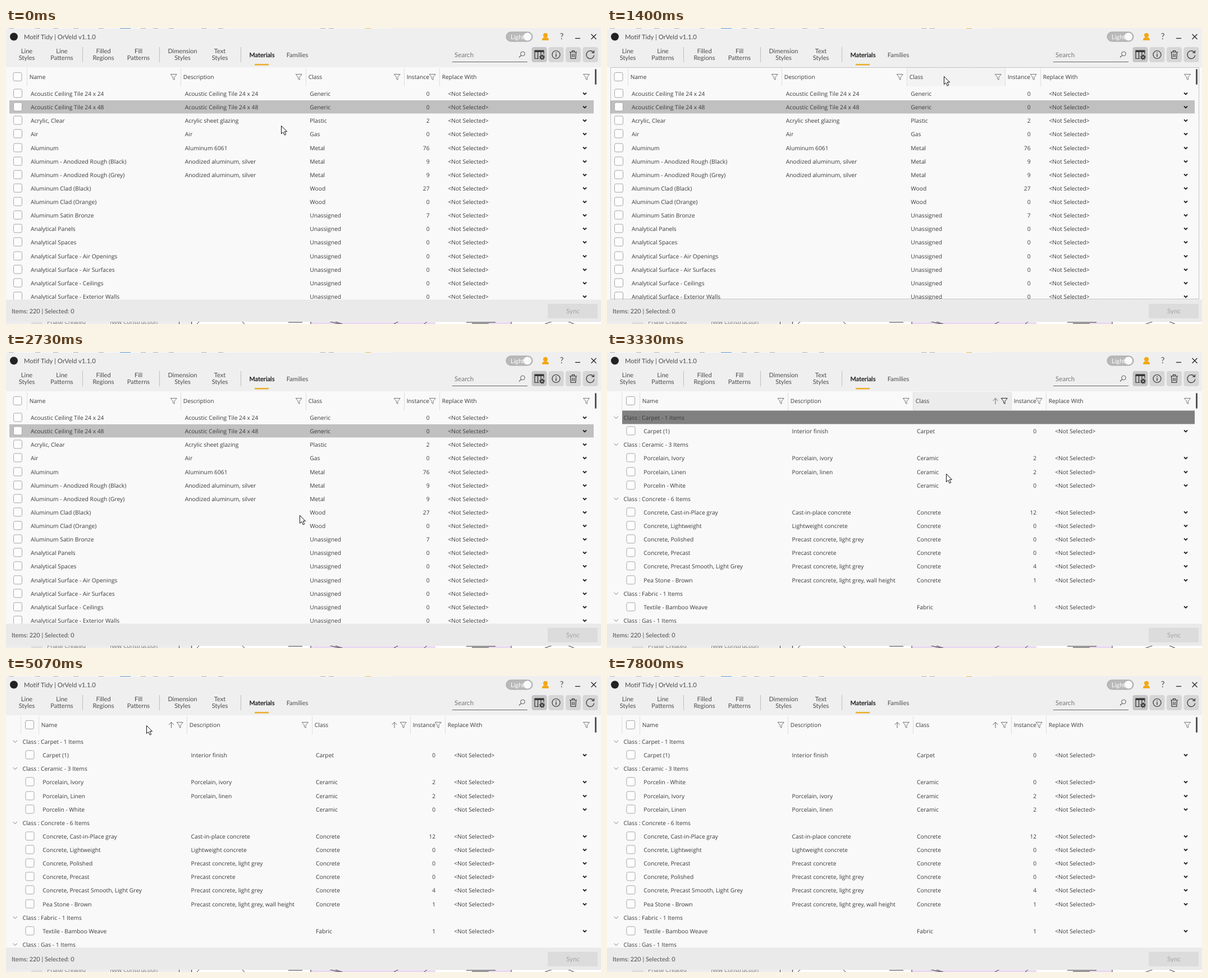
These frames come from a looping animation (1060x528 px, 8000 ms). An HTML page:

```html
<!DOCTYPE html>
<html lang="en">
<head>
<meta charset="utf-8">
<title>Materials table</title>
<style>
html, body { margin: 0; width: 100%; height: 100%; overflow: hidden; background: #fff; }
svg { display: block; font: 10.25px "Open Sans", "Noto Sans", sans-serif; text-rendering: geometricPrecision; }
text { fill: #3a3a3a; white-space: pre; }
.ui { font: 11.1px Lato, sans-serif; fill: #4c4c4c; }
.off { fill: #a3a3a3; }
.mid { text-anchor: middle; }
.end { text-anchor: end; }
.line { fill: none; stroke: #444; }
</style>
</head>
<body>
<svg width="1060" height="528" viewBox="0 0 1060 528">
  <g id="grid"></g><g id="chrome"></g><g id="overlay"></g>
</svg>
<script>
const LOOP = 8000, STEP = 66.667, ROW = 24.13;
const el = id => document.getElementById(id);

// Drawing helpers; text is placed by its vertical centre
const text = (x, y, s, cls = '', extra = '') =>
  `<text x="${x}" y="${y + 4}" class="${cls}" ${extra}>${s.replace(/</g, '&lt;')}</text>`;
const rect = (x, y, w, h, fill, extra = '') =>
  `<rect x="${x}" y="${y}" width="${w}" height="${h}" fill="${fill}" ${extra}/>`;
const line = (d, color = '#444', width = 1, extra = '') =>
  `<path d="${d}" class="line" style="stroke:${color};stroke-width:${width}" ${extra}/>`;
const circle = (x, y, r, fill, extra = '') => `<circle cx="${x}" cy="${y}" r="${r}" fill="${fill}" ${extra}/>`;
const checkbox = (x, y) => rect(x + .5, y - 7.5, 15, 15, '#fdfdfd', 'rx="2.5" stroke="#a6a6a6"');
const funnel = (x, y, color = '#777') => line(`M${x - 5.5} ${y - 5}h11l-4.2 5.2v4.8l-2.6-1.8v-3z`, color);
const cross = (x, y) => line(`M${x - 3} ${y - 3}l6 6m0-6l-6 6`, '#d4626c', 1.3);
const sortArrow = x => line(`M${x} 93V82.5m-4.5 4.5l4.5-4.5 4.5 4.5`, '#666');
const columnsIcon = (x, y) =>
  rect(x - 8.5, y - 8, 17, 3.5, '#333') +
  line(`M${x - 8} ${y - 6}v13h7M${x - 2.5} ${y - 5}v12M${x + 3} ${y - 5}v5M${x + 8} ${y - 5}v4`, '#333', 1.2) +
  circle(x + 5, y + 4.5, 2.6, 'none', 'stroke="#333" stroke-width="2"') +
  circle(x + 5, y + 4.5, 4.2, 'none', 'stroke="#333" stroke-width="1.4" stroke-dasharray="1.65"');

const flatRows = [
  'Acoustic Ceiling Tile 24 x 24|Acoustic Ceiling Tile 24 x 24|Generic|0',
  'Acoustic Ceiling Tile 24 x 48|Acoustic Ceiling Tile 24 x 48|Generic|0',
  'Acrylic, Clear|Acrylic sheet glazing|Plastic|2',
  'Air|Air|Gas|0',
  'Aluminum|Aluminum 6061|Metal|76',
  'Aluminum - Anodized Rough (Black)|Anodized aluminum, silver|Metal|9',
  'Aluminum - Anodized Rough (Grey)|Anodized aluminum, silver|Metal|9',
  'Aluminum Clad (Black)||Wood|27',
  'Aluminum Clad (Orange)||Wood|0',
  'Aluminum Satin Bronze||Unassigned|7',
  ...['Panels', 'Spaces', 'Surface - Air Openings', 'Surface - Air Surfaces',
    'Surface - Ceilings', 'Surface - Exterior Walls'].map(s => `Analytical ${s}||Unassigned|0`)
];
const rowsByName = [
  'Class : Carpet - 1 Items',
  'Carpet (1)|Interior finish|Carpet|0',
  'Class : Ceramic - 3 Items',
  'Porcelain, Ivory|Porcelain, ivory|Ceramic|2',
  'Porcelain, Linen|Porcelain, linen|Ceramic|2',
  'Porcelin - White||Ceramic|0',
  'Class : Concrete - 6 Items',
  'Concrete, Cast-in-Place gray|Cast-in-place concrete|Concrete|12',
  'Concrete, Lightweight|Lightweight concrete|Concrete|0',
  'Concrete, Polished|Precast concrete, light grey|Concrete|0',
  'Concrete, Precast|Precast concrete|Concrete|0',
  'Concrete, Precast Smooth, Light Grey|Precast concrete, light grey|Concrete|4',
  'Pea Stone - Brown|Precast concrete, light grey, wall height|Concrete|1',
  'Class : Fabric - 1 Items',
  'Textile - Bamboo Weave||Fabric|1',
  'Class : Gas - 1 Items'
];
const rowsByDescription = [0, 1, 2, 5, 3, 4, 6, 7, 8, 10, 9, 11, 12, 13, 14, 15].map(i => rowsByName[i]);
const titles = ['Name', 'Description', 'Class', 'Instance', 'Replace With'];

function columnEdges(grouped) {
  return grouped ? [58, 322, 545, 720, 782, 1047] : [37, 311, 534, 709, 772, 1047];
}

function drawRow(row, i, grouped) {
  const y = Math.round(117 + i * ROW), dx = grouped ? 10.7 : 0;
  const [name, desc, cls, count] = row.split('|');
  if (!cls) return line(`M12.5 ${y - 2}l3.7 3.7 3.7-3.7`, '#777') + text(29.5, y, name);
  return checkbox(grouped ? 34.5 : 13, y - .5) + text(grouped ? 65.3 : 44, y, name) +
    text(318.8 + dx, y, desc) + text(541.3 + dx, y, cls) + text(754.5 + dx, y, count, 'end') +
    text(787.5 + dx, y, '<Not Selected>') + line(`M1028 ${y - 1.5}l3 3 3-3`, '#222', 1.8);
}

function drawGrid(t, hover) {
  const grouped = t >= 2795;
  const rows = !grouped ? flatRows : t < 6260 ? rowsByName : rowsByDescription;
  const edges = columnEdges(grouped);
  const pressed = t >= 1395 && t < 1530;
  let s = rect(0, 0, 1060, 528, '#f9f9f9');
  if (hover >= 0) s += rect(edges[hover], 71, edges[hover + 1] - edges[hover], 33, pressed ? '#f3f3f3' : '#ececec');
  if (!grouped) s += rect(6, 129, 1041, 23.5, '#c0c0c0');
  else if (t < 5060) s += rect(27, 104.5, 1020, 24, '#808080');
  s += checkbox(grouped ? 34 : 12.5, 87);
  if (grouped) s += line('M26.5 72V104', '#e2e2e2');
  titles.forEach((title, i) => {
    const right = i < 4 ? edges[i + 1] - 12.3 : 1034;
    s += line(`M${edges[i] + .5} 72V104`, '#dedede') + text(edges[i] + 4.7, 87.4, title) +
      funnel(right, 87.5, hover === i && !pressed ? '#222' : '#777');
  });
  if (grouped) s += sortArrow(692);
  if (t >= 6260) s += sortArrow(517);
  else if (t >= 5060) s += sortArrow(294.5);
  s += rows.map((row, i) => drawRow(row, i, grouped)).join('');
  s += rect(1049, 73, 3, 28, '#555', 'rx="1.5"');
  if (pressed) s += line('M6.5 70.5H1054.5V483.5H6.5Z', '#555', 1, 'stroke-dasharray="1 2"');
  return s;
}

function drawChrome() {
  let s = rect(0, 0, 1060, 70, '#efefef') + rect(0, 484.5, 1060, 40, '#eaeaea');
  // Slivers of the window behind
  s += rect(0, 0, 685, 1, '#fafafa') + rect(203, 0, 19, 1, '#5a9bd8') + rect(640, 0, 10, 1, '#e8bd4a');
  for (const x of [5, 52, 84, 120, 165, 240, 262, 290, 348, 378, 560, 575]) s += rect(x, 0, 9, 1, '#b4b4b4');
  s += rect(0, 524.5, 334, 4, '#ededed') + rect(334, 524.5, 726, 4, '#fff') + rect(45, 524.5, 20, 4, '#ddd') +
    rect(543, 524.5, 222, 4, '#ead9f2') + rect(860, 524.5, 40, 4, '#ead9f2');
  s += '<clipPath id="below"><path d="M0 524H1060V528H0Z"/></clipPath><g clip-path="url(#below)">' +
    text(73, 524, 'Phase Created', '', 'style="fill:#777"') + text(185, 524, 'New Construction', '', 'style="fill:#777"') +
    line('M308.5 523v5M330.5 523v5M340 528l5-5M420 523l5 5M503 525h25M543 523v5M574 523l20 5M584 523l15 5M700 523l-9 5M745 528l6-5M820 525h52M830 527h30M900 523v5M960 528l14-5M1000 523l12 5', '#333') + '</g>';

  s += circle(14, 15.5, 7, '#222');
  s += text(32, 15.5, 'Motif Tidy | OrVeld v1.1.0', 'ui', 'style="font-size:11.3px"');
  s += rect(891, 7, 47, 17, '#b9b9b9', 'rx="8.5" stroke="#a5a5a5"') + text(899, 15.5, 'Light', 'ui', 'style="fill:#fff"') +
    circle(929, 15.5, 7, '#fafafa');
  s += circle(961, 13, 4, '#f3a712') + '<path d="M955 22q0-5 4-5h4q4 0 4 5z" fill="#f3a712"/>';
  s += text(990, 16, '?', 'ui mid', 'style="font-size:15px"') +
    line('M1014 18.5h9', '#222', 1.3) + line('M1042.5 11l9 9m0-9l-9 9', '#222', 1.2);

  [[37, 'Line', 'Styles'], [99.5, 'Line', 'Patterns'], [173.5, 'Filled', 'Regions'], [236, 'Fill', 'Patterns'],
    [314.5, 'Dimension', 'Styles'], [381, 'Text', 'Styles']].forEach(([x, a, b]) =>
    s += text(x, 41.3, a, 'ui mid') + text(x, 53.3, b, 'ui mid'));
  s += line('M136.5 34v27M273.5 34v27M418.5 34v27', '#bdbdbd');
  s += text(456, 47.7, 'Materials', 'ui mid', 'style="fill:#111;stroke:#111;stroke-width:.25"') + text(519, 47.7, 'Families', 'ui mid');
  s += rect(443, 64, 25, 2.6, '#eab02f');

  s += text(799, 47.7, 'Search', 'ui', 'style="fill:#777;font-size:11.6px"') + line('M795 60.5h134', '#666') +
    circle(920.5, 46, 3.8, 'none', 'stroke="#555"') + line('M917.7 48.8l-3.7 3.7', '#555', 1.2);
  [950, 980, 1010.5, 1041].forEach((x, i) =>
    s += rect(x - 13.5, 34, 27, 27, i ? '#d6d6d6' : '#c6c6c6', 'rx="4"'));
  s += columnsIcon(950, 47.5);
  s += circle(980, 47.5, 7, 'none', 'stroke="#333" stroke-width="1.2"') + line('M980 46.5v5M980 43.5v1.5', '#333', 1.4);
  s += line('M1004 43h13M1008.5 43v-2.5h4V43M1005.5 43l.8 11.5h8.4l.8-11.5M1009 46v6M1012 46v6', '#333', 1.2);
  s += line('M1046.5 43.5a7 7 0 1 0 1.3 5M1047.5 40v4.2h-4.2', '#333', 1.2);

  s += text(10, 505, 'Items: 220 | Selected: 0', 'ui', 'style="font-size:10.9px"');
  s += rect(965, 492, 89, 26, '#dcdcdc', 'rx="2"') + text(1010, 505, 'Sync', 'ui mid off', 'style="font-size:11.5px"');
  return s;
}

const menuItems = [['Clear Sorting', 101.5, 1], ['Clear Filtering', 129, 1], ['Hide Column', 160], ['Show All Columns', 185],
  ['Column Settings', 210], ['Stretch to Fill', 239.5], ['Auto Fit', 264.5], ['Group by this Column', 293.5], ['Clear Groups', 319, 1]];

const groupIcon = (y, color) => line(`M428.5 ${y - 4}h4v8h-4zM435.5 ${y - 5}h6.5v10h-6.5zM435.5 ${y - 1.7}h6.5M435.5 ${y + 1.7}h6.5M438.5 ${y - 5}v10M429 ${y}h3`, color);

function drawMenu(x, y) {
  let s = rect(417.5, 86.5, 168, 246, '#fbfbfb',
    'rx="7" stroke="#cfcfcf" style="filter:drop-shadow(0 2px 3px #0005)"');
  for (const [label, cy, disabled] of menuItems) {
    if (!disabled && Math.abs(cy - y) < 12 && x > 417 && x < 586) s += rect(422, cy - 8, 158, 16.5, '#f0f0f0', 'rx="3"');
    s += text(454.5, cy, label, disabled ? 'off' : '');
  }
  s += line('M443 145.5h142M443 224.5h142M443 278.5h142', '#e2e2e2');
  s += text(427, 97.5, 'Z', '', 'style="font-size:9px;fill:#888"') + text(427, 106, 'A', '', 'style="font-size:9px;fill:#888"') + cross(440, 102);
  s += funnel(432, 128.5, '#999') + cross(440, 129) + columnsIcon(434.5, 209);
  s += line('M426 239h7M428.5 236.5l-2.5 2.5 2.5 2.5M437 239h7M441.5 236.5l2.5 2.5-2.5 2.5M425.5 236v6M444.5 236v6', '#777');
  s += line('M426 264h7M430.5 261.5l2.5 2.5-2.5 2.5M437 264h7M439.5 261.5l-2.5 2.5 2.5 2.5M425.5 261v6M444.5 261v6', '#777');
  return s + groupIcon(293.5, '#666') + groupIcon(319, '#b5b5b5') + line('M428 323l5-8', '#dc6f8a', 1.2);
}

// Pointer path: time, x, y
const path = [[0, 490, 174], [667, 601, 91], [867, 601, 109], [1200, 600, 86], [1467, 600, 86], [2200, 523, 273],
  [2333, 523, 291], [2933, 523, 291], [3333, 604, 217], [3533, 600, 88], [3800, 242, 88], [4200, 205, 93], [4733, 250, 88],
  [5400, 250, 88], [5933, 434.5, 87], [6400, 434.5, 87], [6600, 440, 43], [7000, 533, 323], [7267, 535, 234],
  [7400, 556, 142], [7533, 556, 142], [7800, 222, 532], [LOOP, 222, 532]];

function pointerAt(t) {
  const i = Math.max(1, path.findIndex(p => p[0] >= t));
  const [t0, x0, y0] = path[i - 1], [t1, x1, y1] = path[i];
  const u = (t - t0) / (t1 - t0), k = u * u * (3 - 2 * u);
  return [x0 + (x1 - x0) * k, y0 + (y1 - y0) * k];
}

function hoveredColumn(t, x, y, menuOpen) {
  if (menuOpen || (t > 4860 && t < 5440) || (t > 6060 && t < 6440)) return -1;
  if (t > 2795 && t < 3400) return 2;
  if (y < 71 || y > 104) return -1;
  const edges = columnEdges(t >= 2795);
  return edges.findIndex((e, i) => x >= e && x < edges[i + 1]);
}

const start = performance.now();
let lastStep = -1;
function frame() {
  const step = Math.floor(((performance.now() - start) % LOOP + 5) / STEP);
  if (step !== lastStep) {
    lastStep = step;
    const t = Math.min(step * STEP, LOOP - 1);
    const [x, y] = pointerAt(t), menuOpen = t >= 1530 && t < 2730;
    el('grid').innerHTML = drawGrid(t, hoveredColumn(t, x, y, menuOpen));
    el('overlay').innerHTML = (menuOpen ? drawMenu(x, y) : '') +
      `<path transform="translate(${x + .5} ${y + .5})" d="M0 0V14.2L3.3 11.2 5.8 16.6 8.2 15.5 5.7 10.2H10Z" fill="#fff" stroke="#111"/>`;
  }
  requestAnimationFrame(frame);
}
el('chrome').innerHTML = drawChrome();
frame();
</script>
</body>
</html>
```
